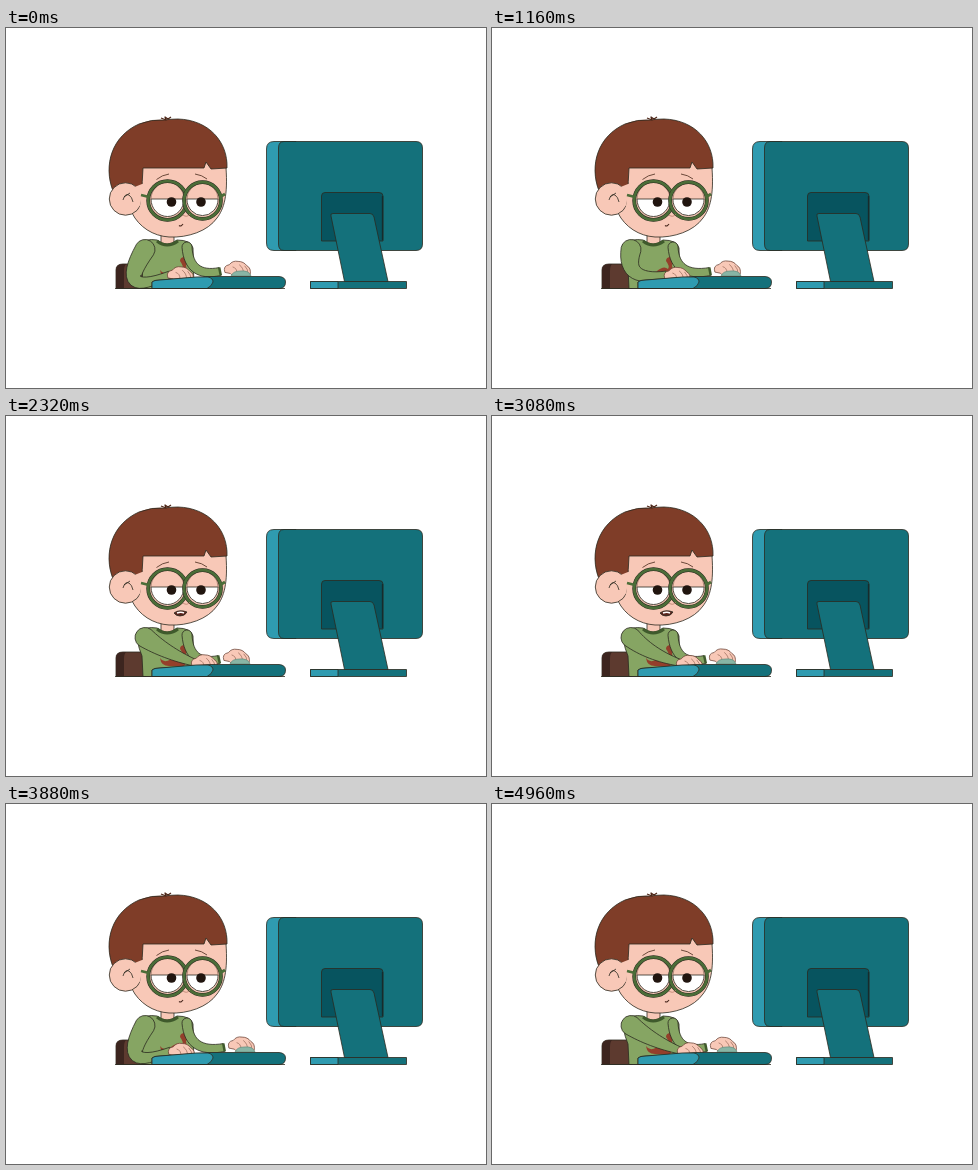
Animation of 480x360 px, one loop 5 s. Source, as an HTML page with a canvas:

```html
<!DOCTYPE html>
<html>
<head>
<meta charset="utf-8">
<style>
html, body { margin: 0; overflow: hidden; background: #fff; }
canvas { display: block; }
</style>
</head>
<body>
<canvas id="stage" width="480" height="360"></canvas>
<script>
const ctx = document.getElementById('stage').getContext('2d');
const LOOP = 5000;
const INK = '#2b2a20', SKIN = '#f8c8b7', HAIR = '#7f3d28', SHIRT = '#86a563', CUFF = '#3f5a2c';
const TEAL = '#14717b', LIGHT = '#2f9bb0', DEEP = '#07545f', RIM = '#4b6d38';

function shape(d, fill, stroke = INK, width = 0.8) {
  const path = new Path2D(d);
  if (fill) { ctx.fillStyle = fill; ctx.fill(path); }
  if (stroke) { ctx.strokeStyle = stroke; ctx.lineWidth = width; ctx.stroke(path); }
}
const line = (d, color = INK, width = 0.8) => shape(d, null, color, width);
const circle = (x, y, r) => `M${x - r} ${y}a${r} ${r} 0 1 1 ${2 * r} 0a${r} ${r} 0 1 1 ${-2 * r} 0Z`;

// Eased value from a list of [time, value] pairs
function track(keys, t) {
  const i = Math.max(1, keys.findIndex(k => k[0] >= t));
  const [t0, a] = keys[i - 1], [t1, b] = keys[i];
  const p = Math.min(1, (t - t0) / (t1 - t0));
  return a + (b - a) * p * p * (3 - 2 * p);
}
const nearKeys = [[0, 174], [760, 189], [1600, 180], [2320, 198], [3080, 197], [3880, 175], [5000, 198]];
const farKeys = [[0, 231], [760, 235], [1600, 235], [2320, 230], [3080, 230], [3880, 235], [5000, 231]];

// Tapered sleeve along a quadratic curve, ending in a cuff
function sleeve([x0, y0], [cx, cy], [x1, y1], w0, w1) {
  const left = [], right = [];
  for (let i = 0; i <= 16; i++) {
    const u = i / 16, v = 1 - u;
    const x = v * v * x0 + 2 * u * v * cx + u * u * x1;
    const y = v * v * y0 + 2 * u * v * cy + u * u * y1;
    const angle = Math.atan2(v * (cy - y0) + u * (y1 - cy), v * (cx - x0) + u * (x1 - cx));
    const r = w0 + (w1 - w0) * u;
    const dx = Math.sin(angle) * r, dy = -Math.cos(angle) * r;
    left.push([x + dx, y + dy]);
    right.unshift([x - dx, y - dy]);
  }
  shape(`M${left.join('L')}L${right.join('L')}A${w0} ${w0} 0 0 1 ${left[0]}`, SHIRT);
  line(`M${left[16]}L${right[0]}`, CUFF, 2.5);
}

function chairAndBody() {
  shape('M110 260.5V242Q110 236 117 236H140V260.5Z', '#5d3a2f');
  shape('M110 260.5V242Q110 236 117 236H120Q118 238 118 243V260.5Z', '#3c251f', null);
  shape('M155 205V216Q162 220 168 215V205Z', SKIN);
  shape('M151 212Q139 210 133 217Q129 223 136 240L137 260.5H188L187 220Q185 212 171 212Q161 220 151 212Z', SHIRT);
  line('M151 213Q161 221 172 213', CUFF, 3);
  // Long-necked animal print
  shape('M154 242Q158 248 165 243Q172 237 176 241Q178 238 174 233Q174 229 179 229Q184 232 180 237Q182 248 178 250H163Q155 250 154 242Z', '#943f2b', null);
}

function head() {
  shape('M136 132H220V140C222 167 218 181 211 190C202 203 182 210 163 209C147 208 133 199 126 185Z', SKIN);
  shape('M107 163C97 137 106 108 133 96Q146 91 158 92Q165 91 172 91C203 92 222 114 221 140L205 141L200 134L198 140H137Q136 153 136 168Z', HAIR);
  line('M155 90L160 92L159 89L162 91L165 89', '#4d2718', 1.3);
  shape(circle(119.5, 171, 16.2), SKIN);
  shape('M126 160Q138 166 133 182L142 185L144 155L136 156Z', SKIN, null);
  line('M117 172Q119 165 123 167Q126 169 127 174M118 169L124 165');
  line('M150.500 151.500Q156 147 163 146M189 146Q196 147 201 151', '#5b3a2c', 0.9);
  for (const [x, r, pupil] of [[161.5, 19.3, 165.5], [196.5, 18.4, 195]]) {
    const lens = circle(x, 172.5, r), e = r - 2.8;
    shape(lens, SKIN, null);
    shape(`M${x - e} 171H${x + e}A${e} ${e + 1} 0 0 1 ${x - e} 171Z`, '#fff');
    line(`M${x - e} 171A${e} ${e} 0 0 1 ${x + e} 171`, '#8d6a58', 0.7);
    shape(circle(pupil, 174, 4.8), '#21150f', null);
    line(lens, INK, 3.8);
    line(lens, RIM, 2.8);
  }
  line('M135 167L143 169M214 169L219 166', RIM, 2.8);
  line('M177 187Q181 190 184 186', '#b87e6c', 0.8);
}

function mouth(t) {
  if (t < 1240 || t > 3520) return line('M173 197.500Q175 199 177 196', '#4b2a20', 1.1);
  if (Math.floor(t / 200) % 2 === 0) return shape('M170 197Q173 193 178 195Q180 199 175 200Q172 200 170 197Z', '#8b3527');
  shape('M168 197Q173 193 181 196Q179 200 174 200Q170 200 168 197Z', '#5a241c');
  line('M171 197Q175 195.500 178 197', '#fff', 1.5);
}

function hand(x, y, size) {
  ctx.save();
  ctx.translate(x, y);
  ctx.scale(size, size);
  shape('M-11 4Q-13 -2 -7 -3Q-4 -7 1 -6Q6 -6 9 -2Q13 0 12 6Q8 8 6 5Q3 8 0 5Q-4 8 -6 5Z', SKIN, '#6e4638', 0.7);
  line('M-4 -1Q0 0 0 5M2 -3Q6 0 6 5M7 -2Q10 1 10 5', '#8f6150', 0.6);
  ctx.restore();
}

function arms(t) {
  const tap = Math.sin(t / 160 * Math.PI * 2) * 0.6;
  const far = track(farKeys, t), near = track(nearKeys, t);
  sleeve([181, 219], [183, 250], [far - 17, 243.5], 5, 4);
  hand(far, 240 - tap / 2, 1.1);
  shape(`M${far - 6} 248Q${far - 4} 243 ${far + 3} 243Q${far + 12} 242 ${far + 14} 248Z`, '#88b5a5', '#5c8778', 0.6);
  const reach = (near - 174) / 24;
  sleeve([139, 221.5], [108 + 52 * reach, 271 - 34 * reach], [near - 10, 246.5], 10, 3.5);
  hand(near, 245.5 + tap, 1.1);
}

function desk() {
  shape('M146 260.5V254Q148 252 154 252L204 248.5H273Q279.500 249 279.500 254Q279.500 260.500 273 260.500Z', TEAL);
  shape('M146 260.5V254Q148 252 154 252L190 249H202Q207 250 207 254Q206 258 201 260.500Z', LIGHT);
  line('M109 260.5H279');
}

function monitor() {
  shape('M268 113.5H290V222.5H268Q260.5 222.5 260.5 215V121Q260.5 113.5 268 113.5Z', LIGHT);
  shape('M278 113.5H410Q416.5 113.5 416.5 120V216Q416.5 222.5 410 222.5H278Q272.5 222.5 272.5 216V120Q272.5 113.5 278 113.5Z', TEAL);
  shape('M319 164.5H373Q377 164.5 377 168V213H315.5V168Q315.5 164.5 319 164.5Z', DEEP);
  line('M376.5 168V212', '#172b2c', 1.3);
  shape('M304.5 253.5H400.5V260.5H304.5Z', TEAL);
  shape('M304.5 253.5H332V260.5H304.5Z', LIGHT);
  shape('M327 185.5H364Q367 185.5 368 189L382 253.5H338.5L325 188Q324 185.5 327 185.5Z', TEAL);
}

function draw(t) {
  ctx.fillStyle = '#fff';
  ctx.fillRect(0, 0, 480, 360);
  ctx.save();
  ctx.beginPath();
  ctx.rect(0, 0, 480, 261);
  ctx.clip();
  ctx.lineJoin = 'round';
  chairAndBody();
  arms(t);
  desk();
  head();
  mouth(t);
  monitor();
  ctx.restore();
}

function tick() {
  draw(Math.floor(performance.now() % LOOP / 40) * 40);
  requestAnimationFrame(tick);
}
tick();
</script>
</body>
</html>
```
